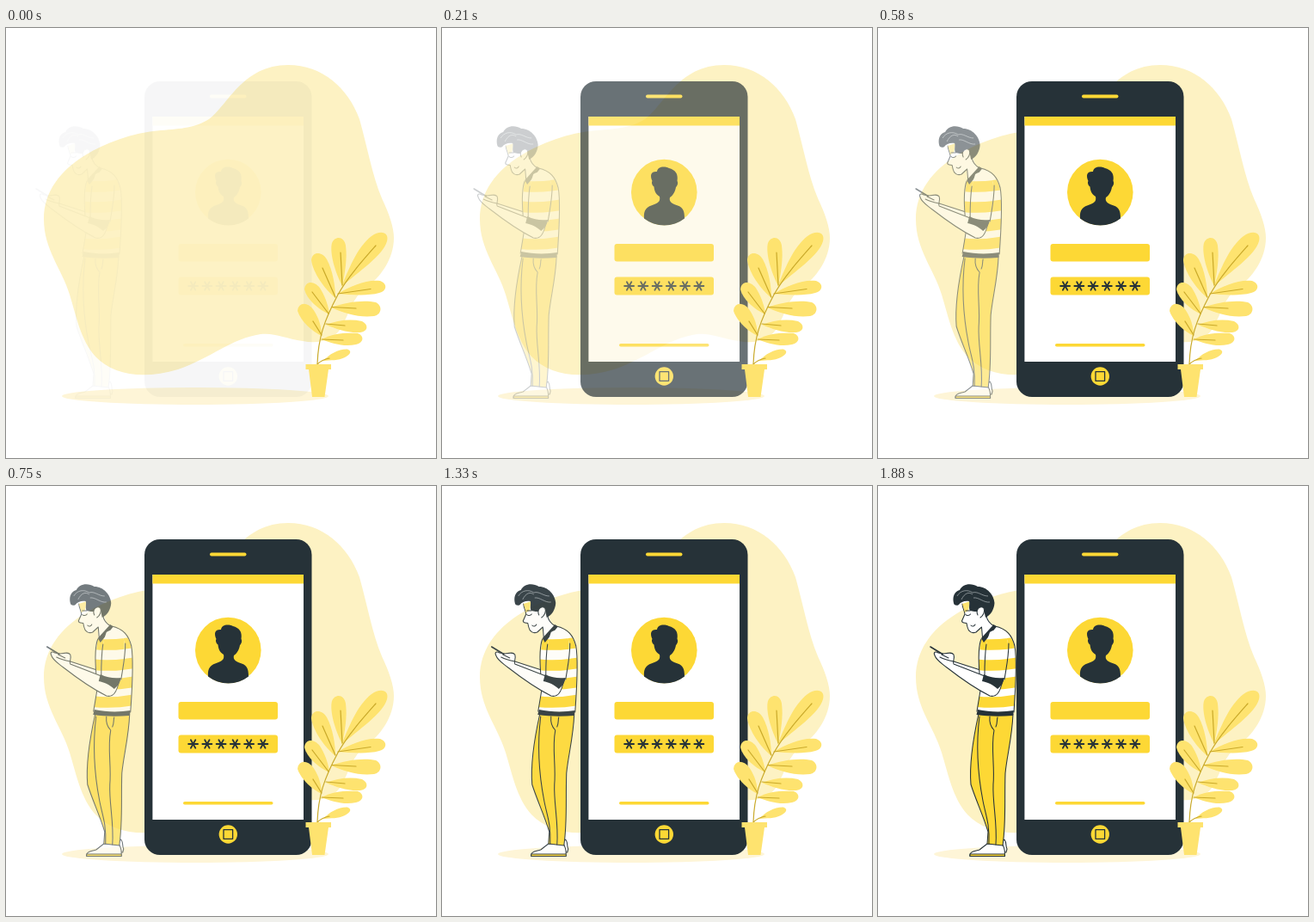
Write an HTML page that moves like this. It is 500 px wide and 500 px high and loops after 1930 ms.

```html
<!DOCTYPE html>
<html lang="en">
<head>
<meta charset="utf-8">
<title>Login illustration</title>
<style>
  html, body { margin: 0; width: 100%; height: 100%; overflow: hidden; background: #fff; }
  svg { display: block; width: 100%; height: 100%; }
  .dark { fill: #263238; }
  .gold { fill: #fdd835; }
  .pale { fill: #fdf2c3; }
  .ground { fill: #fef5d7; }
  .white { fill: #fff; }
  .leaf { fill: #fee36f; }
  .vein { fill: none; stroke: #c9a92a; stroke-width: 1.2; stroke-linecap: round; }
  .ink { stroke: #263238; stroke-width: 1.05; stroke-linejoin: round; stroke-linecap: round; }
  .line { fill: none; }
</style>
</head>
<body>
<svg viewBox="0 0 500 500">
  <defs>
    <clipPath id="shirtClip">
      <path d="M120 178L136 163C147 166 155 173 158 184C162 200 160 225 158 263L115 262L119 235L117 200Z"/>
    </clipPath>
    <clipPath id="sleeveClip">
      <path d="M130 170C142 163 151 172 151 185C151 199 149 211 147 226L124 221C124 205 124 186 130 170Z"/>
    </clipPath>
  </defs>

  <path class="pale" d="M328 43C368 43 398 70 411 106C420 138 426 172 437 198C446 217 451 232 451 244C451 268 436 290 417 303C403 314 400 330 390 348C382 362 365 368 345 364C325 361 312 354 296 356C262 361 238 384 200 397C160 409 125 404 104 382C87 363 82 336 74 310C65 280 44 258 44 222C44 190 64 165 92 148C115 134 145 122 180 119C205 117 220 116 236 106C258 90 275 43 328 43Z"/>
  <ellipse class="ground" cx="220" cy="428" rx="155" ry="10"/>

  <g id="phone">
    <rect class="dark" x="161" y="62" width="194.500" height="367" rx="18"/>
    <rect class="white" x="170.400" y="103" width="175.600" height="285"/>
    <rect class="gold" x="170.400" y="103" width="175.600" height="10.500"/>
    <rect class="gold" x="237" y="77.500" width="42.500" height="4" rx="2"/>
    <circle class="gold" cx="258.300" cy="191" r="38.300"/>
    <path class="dark" d="M235 221.500C234 211 238 208 247 205C252 203 254 201 253 196C248 193 247 189 246.500 184.500C244 183 243.500 179 244.500 178C241.500 171 243 166.500 250 167C251 161 258 160.500 264 163C271 165 275 169 273.500 178C275 180 273.500 184 272 185C271 191 268 195 265 197C264 201 266 203 270 205C280 208 282 211 282 221.500A38.300 38.300 0 0 1 235 221.500Z"/>
    <rect class="gold" x="200.500" y="251" width="115.500" height="20.500" rx="3"/>
    <rect class="gold" x="200.500" y="289.500" width="115.500" height="21" rx="3"/>
    <g id="stars" class="ink" style="stroke-width:1.800"></g>
    <rect class="gold" x="206" y="367" width="104.500" height="3.600" rx="1.800"/>
    <circle class="gold" cx="258.300" cy="405" r="10.700"/>
    <rect class="line ink" x="253" y="399.700" width="10.600" height="10.600" style="stroke-width:1.300"/>
  </g>

  <g id="man">
    <!-- shoes -->
    <path class="white ink" d="M139 418L147 411C150 415 148 418 150 422L149 426L140 426Z"/>
    <path class="white ink" d="M107 430.500C106 425 112 425 118 423L127 416L145 417C147 421 148 426 147 430.500Z"/>
    <path class="gold ink" d="M107 428H147.500V430.500H107Z"/>
    <!-- trousers -->
    <path class="gold ink" d="M117 265L157 265C156 292 150 313 148 334C147 365 149 392 145 418L127 416L128 402C122 382 114 366 108 347C106 322 111 292 117 265Z"/>
    <path class="line ink" d="M118 268C114 300 116 335 122 366C125 382 130 392 129 416M130 268C129 278 133 282 135 284C131 305 136 325 134 347C133 369 139 392 137 417M139 269C138 273 139 276 137 280"/>
    <!-- far arm -->
    <path class="white ink" d="M82 202L88 204L119 214L119 222L84 209Z"/>
    <!-- shirt -->
    <path class="white" d="M120 178L136 163C147 166 155 173 158 184C162 200 160 225 158 263L115 262L119 235L117 200Z"/>
    <g id="shirtBands" clip-path="url(#shirtClip)"></g>
    <path class="line ink" d="M120 178C116 188 117 205 118 218M119 238L115 262M136 163C150 166 156 174 159 186C162 203 160 235 158 263"/>
    <path class="dark" d="M116 260C130 263 145 263 158 261L157 267C143 268 128 268 114.500 266Z"/>
    <!-- neck and head -->
    <path class="white" d="M98 134C98 140 101 146 101 149L97.500 158C99 160 101 159 103 159.500L104 164C105 169 109 172 114 170L120 165L121 178L135 163C130 160 128 155 127 148L124 131Z"/>
    <path class="line ink" d="M98 137C98 141 101 146 101 149L97.500 157C98 160 101 159 103 159.500L104 164C105 169 109 172 114 170L120.500 164L121.500 176M126 151C127 157 130 160 135 163"/>
    <path class="gold" d="M98 137L107 134L105 145L101 147Z" opacity=".7"/>
    <path class="line ink" d="M102 149.500C103 151 106 151 107.500 149M102 145L107 145M108 162C110 164 112 163 113 161"/>
    <path class="dark" d="M88 136C86 128 90 122 95 121C98 114 108 112 116 117C127 117 135 127 135.500 136C135 144 131 150 125 153L123 143L119 146L112 146L107 145C105 141 107 138 106 134C101 133 96 135 94 138C91 140 88 138 88 136Z"/>
    <path class="white ink" d="M116 150C113 144 119 138 123 142C125 146 122 151 119 153"/>
    <path class="line" d="M92 128C96 121 104 120 110 124C116 122 121 128 128 128M97 132C101 124 106 123 110 126M111 130C117 129 123 136 130 135" stroke="#aeb5b8" stroke-width=".7"/>
    <path class="dark" d="M120 177L134.500 161L138 163.500L123 182Z"/>
    <!-- near arm -->
    <path class="white ink" d="M124 221L88 207C86 204 90 202 88 196C86 193 82 194 77 195L70 194C67 192 64 193 66 197C68 203 74 206 80 211C98 225 116 237 130 244C138 246 142 240 145 226Z"/>
    <path class="line ink" d="M72 199C78 202 83 203 88 204M74 196L82 200"/>
    <path class="white" d="M130 170C142 163 151 172 151 185C151 199 149 211 147 226L124 221C124 205 124 186 130 170Z"/>
    <g id="sleeveBands" clip-path="url(#sleeveClip)"></g>
    <path class="line ink" d="M126 184C124 197 124 209 124 221M152 183C152 199 149 212 147 225"/>
    <path class="dark" d="M123 219C131 223 139 224 147 223C146 228 144 232 139 236C134 231 127 228 121 227Z"/>
    <path class="line ink" d="M61 187L75 195.500" style="stroke-width:1.600"/>
  </g>

  <g id="plant">
    <g id="leaves"></g>
    <path class="vein" d="M362 391C363 360 370 340 386 310C397 290 415 270 430 253"/>
    <path class="vein" d="M362 391C366 387 370 385 376 384"/>
    <path class="leaf" d="M348.500 391H378V397H375L370.500 429H356L352 397H348.500Z"/>
  </g>
</svg>
<script>
const LOOP = 1930;
const PHONE_FADE = 490;
const SLIDE = 26;
const byId = id => document.getElementById(id);

function add(parent, d, attrs) {
  const path = document.createElementNS("http://www.w3.org/2000/svg", "path");
  path.setAttribute("d", d);
  for (const name in attrs) path.setAttribute(name, attrs[name]);
  parent.append(path);
}

// Password asterisks: three crossing strokes each
for (let i = 0; i < 6; i++) {
  const x = 217.6 + i * 16.25;
  add(byId("stars"), `M${x - 5.5} 300h11M${x - 2.7} 295.300l5.400 9.400M${x - 2.7} 304.700l5.400 -9.400`);
}

function addBands(id, levels, width) {
  for (const y of levels) {
    add(byId(id), `M110 ${y}Q136 ${y + 4} 166 ${y - 2}`,
      { fill: "none", stroke: "#fdd835", "stroke-width": width });
  }
}
addBands("shirtBands", [183, 207, 229, 250], 12.5);
addBands("sleeveBands", [183, 207], 12.5);

// Each leaf: outline, then its vein
const leaves = [
  ["M390 301C398 282 408 255 425 242C436 234 446 238 443 248C438 265 410 283 390 301Z", ""],
  ["M391 300C383 285 376 262 379 250C382 242 393 241 395 253C397 268 394 285 391 300Z", "M391 299L389 261"],
  ["M383 314C371 304 357 285 355 270C356 259 368 260 373 269C380 282 383 300 383 314Z", "M383 313L368 279"],
  ["M376 333C363 327 350 316 347 304C348 293 360 294 366 304C372 314 375 324 376 333Z", "M375 332L356 307"],
  ["M367 358C356 353 343 341 339 329C340 319 350 318 357 327C364 337 367 348 367 358Z", "M367 357L357 341"],
  ["M386 309C400 300 420 292 435 294C444 297 443 306 434 308C420 312 400 310 386 309Z", "M386 309L424 303.500"],
  ["M378 325C395 319 415 316 430 319C438 323 437 333 428 335C410 337 395 332 378 325Z", "M379 324.500L407 326"],
  ["M372 345C385 340 400 338 414 341C422 345 421 353 412 354C398 355 384 350 372 345Z", "M372 344L394 346"],
  ["M367 362C380 355 395 354 409 355C417 358 416 366 407 368C393 371 380 367 367 362Z", "M367 362L392 363"],
  ["M369 387C376 379 387 373 397 373.500C403 376 400 380 394 383C386 387 378 386 369 387Z", ""]
];
for (const [outline, vein] of leaves) {
  add(byId("leaves"), outline, { class: "leaf" });
  if (vein) add(byId("leaves"), vein, { class: "vein" });
}

const fadeIn = u => 1 - 0.97 * (1 - Math.min(u, 1)) ** 2;
// Share of the slide still to go: soft start, long settle
const remaining = u => (1 - u) ** 2 * (1 + 1.6 * u - 1.7 * u * u);

function render(time) {
  const u = time / LOOP;
  byId("phone").setAttribute("opacity", fadeIn(time / PHONE_FADE));
  byId("man").setAttribute("opacity", fadeIn(u));
  byId("man").setAttribute("transform", `translate(${-SLIDE * remaining(u)} 0)`);
}

const start = performance.now();
function tick() {
  render((performance.now() - start) % LOOP);
  requestAnimationFrame(tick);
}
tick();
</script>
</body>
</html>
```
